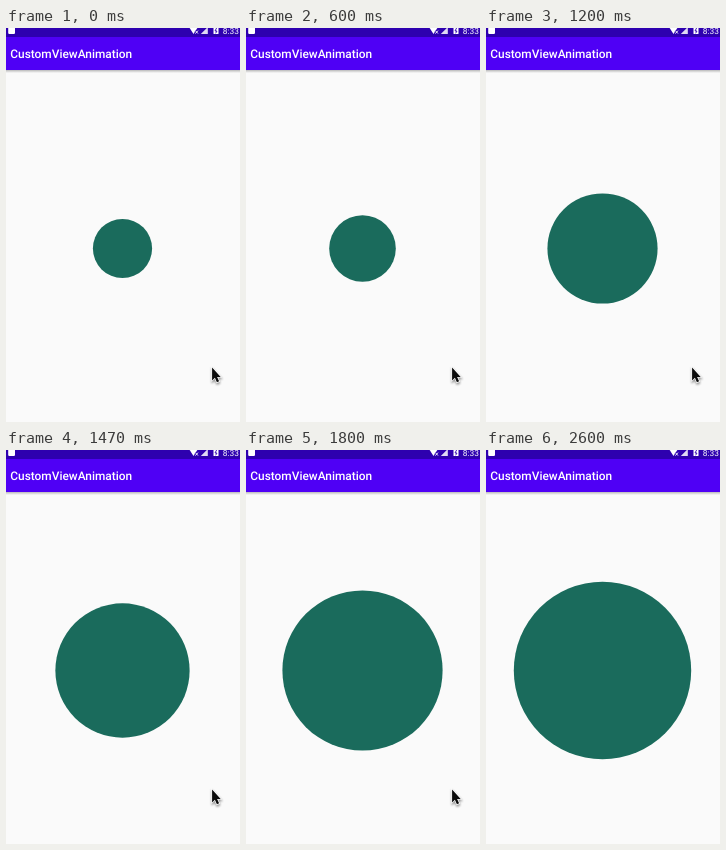
An HTML page that plays this animation: 234x394 px, repeating every 2990 ms.

```html
<!DOCTYPE html>
<html lang="en">
<head>
<meta charset="utf-8">
<title>Growing circle</title>
<style>
  html, body { margin: 0; height: 100%; overflow: hidden; background: #fafafa; }
  svg { display: block; width: 100vw; height: 100vh; }
  text { font-family: Roboto, sans-serif; fill: #fff; text-rendering: geometricPrecision; }
</style>
</head>
<body>
<svg viewBox="0 0 234 394">
  <defs>
    <linearGradient id="shade" x2="0" y2="1">
      <stop stop-color="#000" stop-opacity=".26"/>
      <stop offset="1" stop-color="#000" stop-opacity="0"/>
    </linearGradient>
    <filter id="blur" x="-50%" y="-50%" width="200%" height="200%">
      <feGaussianBlur stdDeviation="1.3"/>
    </filter>
    <path id="arrow" d="M0 0V12.8L2.8 10.2L4.8 14.7L7 13.7L5 9.3H8.6Z"/>
  </defs>

  <rect width="234" height="394" fill="#fafafa"/>
  <rect y="42" width="234" height="3" fill="url(#shade)"/>
  <rect width="234" height="42" fill="#4f00f5"/>
  <rect width="234" height="9" fill="#2e00af"/>
  <text x="4.3" y="30.3" font-size="11.9" font-weight="500">CustomViewAnimation</text>

  <g fill="#fff">
    <rect x="2.2" y="-1" width="6.8" height="6.9" rx=".8"/>
    <path d="M183 -1H192L187.5 6Z"/>
    <path d="M194.8 6L201.8 -1V6Z" opacity=".85"/>
    <rect x="207.5" y="-1" width="5" height="7" rx=".6"/>
  </g>
  <g id="cross" fill="none">
    <path d="M189.4 2.6L192 5.6M192 2.6L189.4 5.6" stroke="#2e00af" stroke-width="2.2"/>
    <path d="M189.4 2.6L192 5.6M192 2.6L189.4 5.6" stroke="#fff" stroke-width=".9"/>
  </g>
  <path d="M210.6 0L209 3H211L209.6 5.3" fill="none" stroke="#2e00af" stroke-width=".9"/>
  <text x="216.8" y="5.7" font-size="8.4">8:33</text>

  <circle id="ball" cx="116.5" cy="220.5" r="29.6" fill="#1a6b5c"/>

  <g id="cursor">
    <use href="#arrow" x=".3" y="1.6" stroke="#000" stroke-width="1.6" opacity=".42" filter="url(#blur)"/>
    <use href="#arrow" fill="#0a0a0a" stroke="#fff" stroke-width="1.4" paint-order="stroke"/>
  </g>
</svg>
<script>
  const LOOP = 2990, STEP = 200 / 3;
  const ball = document.getElementById('ball');
  const cursor = document.getElementById('cursor');
  const progress = (t, start, length) => Math.min(1, Math.max(0, (t - start) / length));

  function draw(now) {
    // The picture advances 15 times a second and rests from 2600 ms on.
    const t = Math.min(2600, Math.floor((now % LOOP + 4) / STEP) * STEP);

    const grow = (1 - Math.cos(Math.PI * progress(t, 272, 2035))) / 2;
    ball.setAttribute('r', 29.6 + 59.1 * grow);

    const leave = progress(t, 2333.3, 266.7);
    cursor.setAttribute('transform', `translate(206.1 ${339.6 + 62 * leave ** 2})`);

    requestAnimationFrame(() => draw(performance.now()));
  }
  draw(0);
</script>
</body>
</html>
```
